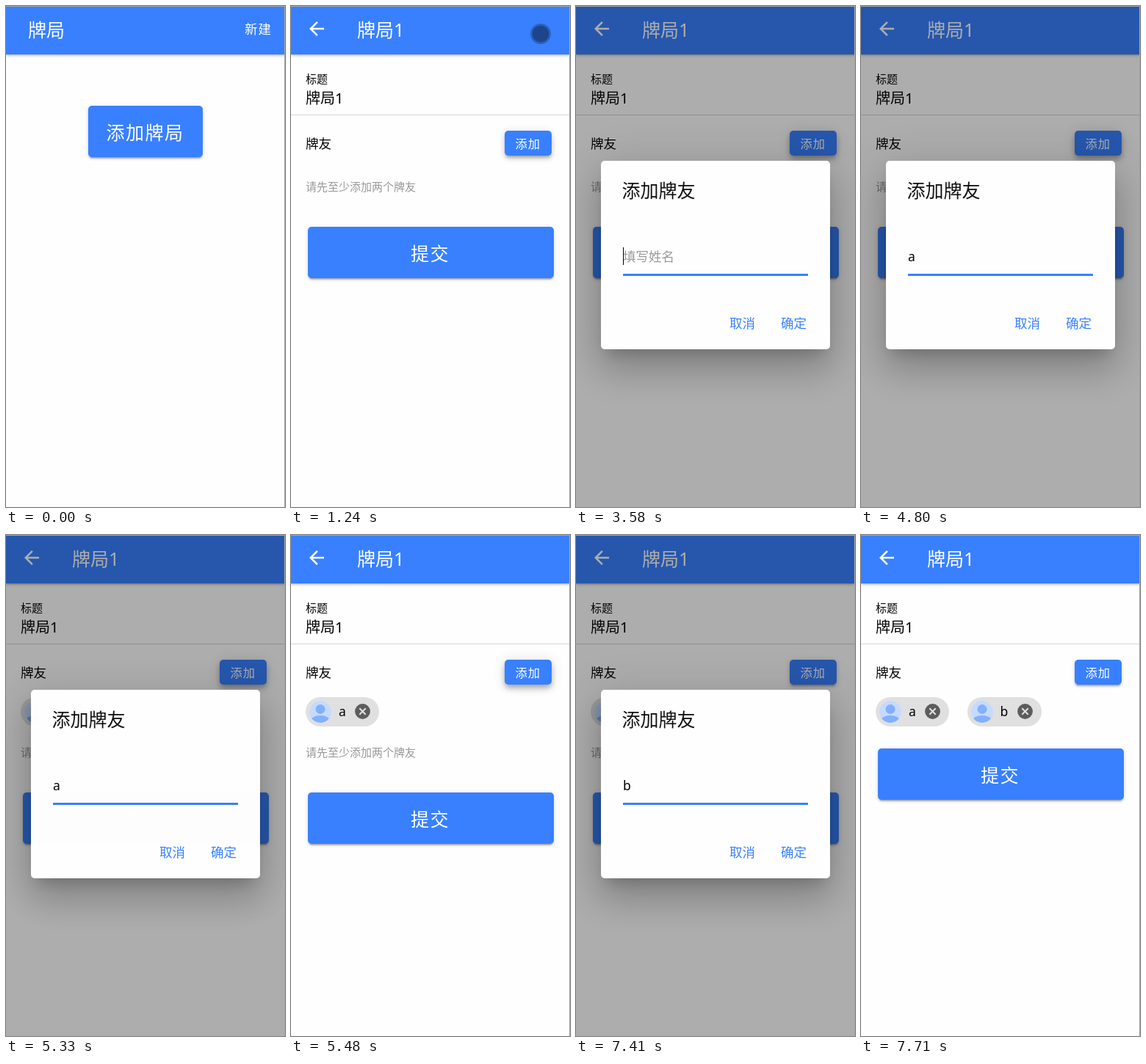
An HTML page for the animation above (8 s loop, 380x683 px).

```html
<!DOCTYPE html>
<html lang="zh-CN">
<head>
<meta charset="utf-8">
<title>牌局</title>
<style>
  html, body { margin: 0; width: 100%; height: 100%; overflow: hidden; background: #fefefe; }
  #stage {
    position: relative; width: 380px; height: 683px; overflow: hidden;
    font-family: "Noto Sans", "Noto Sans CJK SC", "Noto Sans CJK", sans-serif;
    --blue: #3880ff;
  }
  #stage div, svg { position: absolute; }
  svg { left: 0; top: 0; overflow: hidden; }
  .layer { inset: 0; }
  .page { background: #fefefe; }
  .bar {
    left: 0; top: 0; width: 380px; height: 66px; background: var(--blue);
    box-shadow: 0 1px 2px rgba(0,0,0,.2), 0 2px 4px rgba(0,0,0,.16);
  }
  .btn {
    background: var(--blue); border-radius: 5px;
    box-shadow: 0 4px 1px -2.5px rgba(0,0,0,.2), 0 2.5px 2.5px rgba(0,0,0,.14), 0 1px 6px rgba(0,0,0,.12);
  }
  .edge { background: #a6a6a6; }

  .s15 { font-size: 15px; }
  .s17 { font-size: 17.5px; }
  .s20 { font-size: 20px; }
  .s25 { font-size: 25px; }
  .sp { letter-spacing: .06em; }
  .w { fill: #fff; }
  .b { fill: #3880ff; }
  .g { fill: #999; }

  /* one loop is 8 s, so 1% is 80 ms */
  .a { animation: 8s infinite ease-in-out; }
  .s { animation: 8s infinite step-end; }

  #ripple { left: 315px; top: 11px; width: 58px; height: 40px; border-radius: 3px; overflow: hidden; animation-name: rippleFade; }
  #ripple div { left: -15px; top: -13px; width: 80px; height: 80px; border-radius: 50%; background: #fff; animation-name: rippleGrow; }
  @keyframes rippleFade { 0%, 6% { opacity: 0 } 7% { opacity: .16 } 11.9% { opacity: .16 } 14%, 100% { opacity: 0 } }
  @keyframes rippleGrow { 0%, 6% { transform: scale(.3) } 8.125%, 100% { transform: scale(1) } }

  #game { animation-name: enter; animation-timing-function: cubic-bezier(.36,.66,.04,1); }
  @keyframes enter {
    0%, 11.875% { opacity: 0; transform: translateY(4px) }
    15.2%, 100% { opacity: 1; transform: none }
  }

  #add { left: 291px; top: 170px; width: 64px; height: 34px; animation-name: press; }
  @keyframes press {
    0%, 31%, 36.25%, 75.5%, 79.25%, 100% { background: #3880ff; }
    31.6%, 34.4%, 76.1%, 77.6% {
      background: #5c95ff;
      box-shadow: 0 4px 6px -1px rgba(0,0,0,.2), 0 6px 10px rgba(0,0,0,.14), 0 1px 18px rgba(0,0,0,.12);
    }
  }

  #foot { inset: 0; animation-name: foot; }
  @keyframes foot {
    0% { transform: none } 66.625% { transform: translateY(50px) }
    94.5%, 100% { transform: translateY(-10px) }
  }
  #hint { animation-name: hint; }
  @keyframes hint { 0% { opacity: 1 } 94.5%, 100% { opacity: 0 } }
  #chipA { animation-name: chipA; }
  @keyframes chipA { 0% { opacity: 0 } 66.625%, 100% { opacity: 1 } }
  #chipB { animation-name: chipB; }
  @keyframes chipB { 0% { opacity: 0 } 94.5%, 100% { opacity: 1 } }

  #shade { background: rgba(0,0,0,.32); animation-name: fade; }
  #dialog {
    left: 34px; top: 211px; width: 312px; height: 257px; border-radius: 5px; background: #fefefe;
    box-shadow: 0 14px 19px -9px rgba(0,0,0,.2), 0 30px 48px 4px rgba(0,0,0,.14), 0 11px 58px 10px rgba(0,0,0,.12);
    animation-name: fade, pop;
  }
  @keyframes fade {
    0%, 31% { opacity: 0 } 32.875%, 66.625% { opacity: 1 }
    68.5%, 75.69% { opacity: 0 } 77.56%, 94.25% { opacity: 1 }
    96.125%, 100% { opacity: 0 }
  }
  @keyframes pop {
    0%, 31% { transform: scale(.9) } 32.875%, 68.5% { transform: none }
    70%, 75.69% { transform: scale(.9) } 77.56%, 100% { transform: none }
  }
  #focus { animation-name: focus; }
  @keyframes focus { 0% { opacity: 0 } 41.625% { opacity: 1 } 70% { opacity: 0 } 81%, 100% { opacity: 1 } }
  #prompt { animation-name: prompt; }
  @keyframes prompt { 0% { opacity: 1 } 52.75% { opacity: 0 } 70% { opacity: 1 } 84.375%, 100% { opacity: 0 } }
  #typeA { animation-name: typeA; }
  @keyframes typeA { 0% { opacity: 0 } 52.75% { opacity: 1 } 70%, 100% { opacity: 0 } }
  #typeB { animation-name: typeB; }
  @keyframes typeB { 0% { opacity: 0 } 84.375%, 100% { opacity: 1 } }
  #caret { animation-name: caret; }
  @keyframes caret {
    0% { opacity: 0; transform: none }
    41.625% { opacity: 1; transform: none }
    48.125% { opacity: 0; transform: none }
    52.75% { opacity: 1; transform: translateX(9px) }
    60% { opacity: 0; transform: none }
    81% { opacity: 1; transform: none }
    84.375% { opacity: 1; transform: translateX(11px) }
    92.625%, 100% { opacity: 0; transform: none }
  }

  #touch {
    left: 326px; top: 24px; width: 28px; height: 28px; border-radius: 50%;
    background: radial-gradient(circle, rgba(0,0,0,.46) 10.8px, rgba(0,0,0,.24) 11.8px);
    animation-name: touch;
  }
  @keyframes touch {
    0% { opacity: 0; transform: none }
    6.25% { opacity: 1; transform: none }
    22.125% { opacity: 0; transform: none }
    31% { opacity: 1; transform: translate(-4px, 155px) }
    36.25%, 100% { opacity: 0; transform: none }
  }
</style>
</head>
<body>
<div id="stage">
  <div class="layer page">
    <div class="bar"></div>
    <div id="ripple" class="a"><div class="a"></div></div>
    <div class="btn" style="left:112px;top:136px;width:156px;height:70px"></div>
    <svg width="380" height="683">
      <text class="s25 w" x="30" y="41.5">牌局</text>
      <text class="s17 w sp" x="325" y="38">新建</text>
      <text class="s25 w sp" x="136.5" y="181.5">添加牌局</text>
    </svg>
  </div>

  <div id="game" class="layer page a">
    <div class="bar"></div>
    <div id="add" class="btn a"></div>
    <svg width="380" height="683">
      <defs>
        <clipPath id="round"><circle cx="40" cy="241" r="15"/></clipPath>
        <g id="avatar" clip-path="url(#round)">
          <circle cx="40" cy="241" r="15" fill="#c4daff"/>
          <circle cx="40" cy="237.5" r="6.5" fill="#82b0ff"/>
          <ellipse cx="40" cy="254" rx="13.5" ry="8" fill="#82b0ff"/>
        </g>
        <g id="close">
          <circle cx="97.5" cy="240.5" r="10.4" fill="#5c5c5c"/>
          <path d="M93.3 236.3l8.4 8.4m0-8.4l-8.4 8.4" stroke="#e0e0e0" stroke-width="2"/>
        </g>
      </defs>
      <svg x="20" y="16" width="30" height="30" viewBox="0 0 512 512">
        <path class="w" d="M427 234.6H167.3L285.9 116 256 85 85 256l171 171 29.9-31-118.6-118.6H427z"/>
      </svg>
      <text class="s25 w" x="90" y="41.5">牌局1</text>
      <text class="s15" x="20" y="105">标题</text>
      <text class="s20" x="20" y="133">牌局1</text>
      <path d="M0 148.5H380" stroke="#d6d6d6"/>
      <text class="s17" x="20" y="194">牌友</text>
      <text class="w sp" font-size="16.25" x="305.5" y="193.5">添加</text>
      <g id="chipA" class="s">
        <rect x="20" y="221" width="100" height="40" rx="20" fill="#e0e0e0"/>
        <use href="#avatar"/><use href="#close"/>
        <text class="s17" x="65" y="247">a</text>
      </g>
      <g id="chipB" class="s">
        <rect x="145" y="221" width="101" height="40" rx="20" fill="#e0e0e0"/>
        <use href="#avatar" x="125"/><use href="#close" x="126"/>
        <text class="s17" x="189.5" y="247">b</text>
      </g>
    </svg>
    <div id="foot" class="s">
      <div class="btn" style="left:23px;top:301px;width:335px;height:70px"></div>
      <svg width="380" height="683">
        <text id="hint" class="s15 g s" x="20" y="252">请先至少添加两个牌友</text>
        <text class="s25 w sp" x="163" y="346.5">提交</text>
      </svg>
    </div>
  </div>

  <div id="shade" class="layer a"></div>
  <div id="dialog" class="a">
    <svg width="312" height="257" viewBox="34 211 312 257">
      <text class="s25" x="62.5" y="261" fill="#111">添加牌友</text>
      <path d="M64 366.5H316" stroke="#d9d9d9"/>
      <rect id="focus" class="b s" x="64" y="365" width="252" height="3"/>
      <text id="prompt" class="s17 g s" x="64" y="348">填写姓名</text>
      <text id="typeA" class="s17 s" x="64" y="348">a</text>
      <text id="typeB" class="s17 s" x="64" y="348">b</text>
      <rect id="caret" class="s" x="64" y="329" width="1" height="24"/>
      <text class="s17 b" x="209" y="439">取消</text>
      <text class="s17 b" x="279" y="439">确定</text>
    </svg>
  </div>

  <div id="touch" class="s"></div>
  <div class="edge" style="left:0;top:0;width:380px;height:1px"></div>
  <div class="edge" style="left:379px;top:0;width:1px;height:683px"></div>
</div>
</body>
</html>
```
